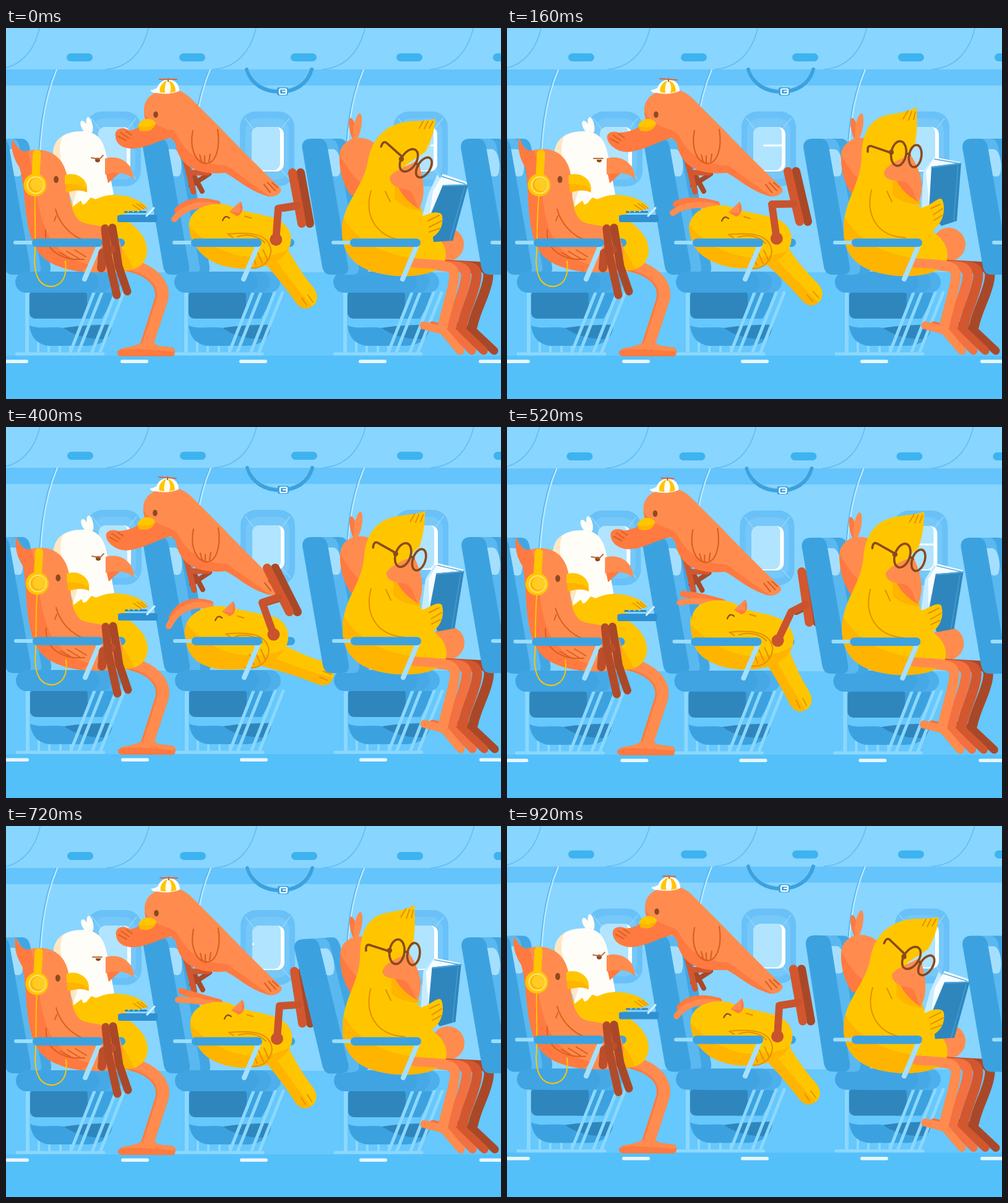
Write an HTML page with a canvas that moves like this. It is 800x600 px and loops after 0.96 s.

```html
<!DOCTYPE html>
<html lang="en">
<head>
<meta charset="utf-8">
<title>Bird flight</title>
<style>
html, body { margin: 0; width: 100%; height: 100%; overflow: hidden; background: #86d4ff; }
canvas { display: block; width: 800px; height: 600px; }
</style>
</head>
<body>
<canvas id="stage" width="800" height="600"></canvas>
<script>
const ctx = document.getElementById('stage').getContext('2d');
const LOOP = 960, STEP = 40, ROW = 257;
const BLUE = '#3ca2df', NAVY = '#2f86bd', PALE = '#9addff';
const YELLOW = '#ffc600', GOLD = '#ffb400', ORANGE = '#ff8c4e', CORAL = '#ff7a40';
const RED = '#d2572f', RUST = '#a94828', BROWN = '#8f4a20', GROOVE = '#d9601f', AMBER = '#e58f00';

// Tracks: [time, ...values], cyclic over the loop.
const tracks = {
  shake: [[0, 0, 0], [160, 1, 0], [240, -.6, -1.2], [400, 1, -1], [520, -1.6, 0], [720, 1, 1], [920, 1, -1.6]],
  curl: [[0, .12], [160, .37], [240, 1], [400, .92], [520, -.35], [720, 0], [920, .16]],
  tail: [[0, 55], [160, 49], [240, 29], [400, 22], [520, 63], [720, 57], [920, 53]],
  foot: [[0, 440, 292, 463, 234, 478, 316], [160, 427, 285, 453, 232, 472, 313], [240, 405, 286, 417, 225, 445, 300],
    [400, 413, 285, 421, 229, 457, 300], [520, 461, 299, 478, 234, 490, 316], [720, 441, 290, 465, 234, 478, 318], [920, 439, 292, 462, 233, 477, 317]],
  crest: [[0, 272, 309], [160, 267, 299], [240, 258, 323], [400, 262, 323], [520, 281, 284], [720, 277, 280], [920, 273, 309]],
  nod: [[0, 1], [160, 0], [240, .08], [400, .46], [520, .45], [720, -.06], [920, 1.08]],
  book: [[0, 1], [160, 0], [240, .06], [400, .45], [520, .45], [720, .12], [920, 1]],
  beat: [[0, 0], [160, 8], [240, 4.5], [400, 5], [520, 6], [720, 4], [920, 0]],
  recline: [[0, .5], [160, 0], [520, 0], [720, -14], [920, 4]]
};

// Monotone cubic through the keys: speed carries on, turning points stay put.
function at(name, t) {
  const keys = tracks[name], n = keys.length;
  const key = i => {
    const turn = Math.floor(i / n), [time, ...values] = keys[i - turn * n];
    return [time + turn * LOOP, ...values];
  };
  let i = n - 1;
  while (keys[i][0] > t) i--;
  const [k0, k1, k2, k3] = [key(i - 1), key(i), key(i + 1), key(i + 2)];
  const span = k2[0] - k1[0], u = (t - k1[0]) / span;
  const slope = (a, b, c) => (b[c] - a[c]) / (b[0] - a[0]);
  const join = (p, q) => p * q > 0 ? 2 * p * q / (p + q) : 0;
  return k1.slice(1).map((v, c) => {
    const s = slope(k1, k2, c + 1);
    const m1 = join(slope(k0, k1, c + 1), s) * span, m2 = join(s, slope(k2, k3, c + 1)) * span;
    return v + u * m1 + u * u * (3 * s * span - 2 * m1 - m2) + u ** 3 * (m1 + m2 - 2 * s * span);
  });
}

function morph(a, b, k) {
  const to = b.match(/-?[\d.]+/g);
  let i = 0;
  return a.replace(/-?[\d.]+/g, n => +n + (to[i++] - n) * k);
}

function fill(color, path) {
  ctx.fillStyle = color;
  ctx.fill(new Path2D(path));
}
function line(color, width, path) {
  ctx.strokeStyle = color;
  ctx.lineWidth = width;
  ctx.stroke(new Path2D(path));
}
function oval(color, x, y, rx, ry = rx, turn = 0) {
  ctx.fillStyle = color;
  ctx.beginPath();
  ctx.ellipse(x, y, rx, ry, turn, 0, 7);
  ctx.fill();
}
function box(color, x, y, w, h, r = 0) {
  ctx.fillStyle = color;
  ctx.beginPath();
  ctx.roundRect(x, y, w, h, r);
  ctx.fill();
}
function shifted(x, y, draw, turn = 0) {
  ctx.save();
  ctx.translate(x, y);
  ctx.rotate(turn);
  draw();
  ctx.restore();
}
function shaded(path, base, shade, shadow) {
  fill(base, path);
  ctx.save();
  ctx.clip(new Path2D(path));
  fill(shade, shadow);
  ctx.restore();
}

function cabin(t) {
  box('#88d5ff', -9, -9, 820, 410);
  box('#66c8fc', -9, 395, 820, 140);
  box('#54c0fa', -9, 530, 820, 90);
  box('#64c4fb', -9, 67, 820, 26);
  for (const x of [82, 330, 578]) {
    line('#58b9f2', 2, `M${x - 2} 67C${x - 22} 115 ${x - 31} 165 ${x - 32} 300`);
    line('#c5ebff', 2, `M${x} 67C${x - 20} 115 ${x - 29} 165 ${x - 30} 300`);
  }
  box('#88d5ff', -9, -9, 820, 76);
  for (const x of [55, 231, 405, 581, 756]) line('#62bdf3', 1.6, `M${x} -4C${x - 8} 36 ${x - 31} 64 ${x - 70} 67`);
  for (const x of [98, 280, 460, 631, 787]) box('#3db3f0', x, 41, 42, 13, 6.5);
  for (const x of [-9, 185, 377, 570, 764]) box('#e9f7ff', x, 536.5, 45, 5.5, 3);
  line(BLUE, 6, 'M389 67C397 92 418 103 442 103S487 92 494 67');
  line('#78c8f7', 1, 'M392 67C400 89 420 99 442 99S482 89 490 67');
  box(BLUE, 438, 96, 18, 13, 3);
  line('#fff', 2.2, 'M444 98.5H451Q453 98.5 453 100V105Q453 107 451 107H444Q442 107 442 105V100Q442 98.5 444 98.5M453 102.5H447');
  for (const x of [130, 378, 626]) porthole(x, t);
}

function porthole(x, t) {
  box('#69c1f7', x, 135, 88, 121, 25);
  box('#76c8f9', x + 9, 146, 70, 99, 20);
  for (const [a, b, c, d] of [[8, 146, 22, 164], [80, 146, 66, 164], [8, 244, 22, 228], [80, 244, 66, 228]])
    line('#8fd6ff', 1.5, `M${x + a} ${b}L${x + c} ${d}`);
  ctx.save();
  ctx.beginPath();
  ctx.roundRect(x + 19, 160, 52, 72, 12);
  ctx.clip();
  box('#fff', x, 150, 90, 90);
  box('#b0e4ff', x + 12, 158, 53, 72, 11);
  // A pale streak outside passes twice per loop.
  const head = 686 - (t % 480) * 1.706;
  for (const left of [head, head - 819]) box('#fff', left, 188.5, 124, 3, 1.5);
  ctx.restore();
}

const BACK = 'M221 193C221 183 227 179 236 179H249C256 179 260 184 262 192L296 386C297 396 292 399 284 399H269C260 399 256 395 254 386Z';
// Leans around the foot of the backrest; lean is the travel of its top edge.
function seatBack(x, lean = 0) {
  shifted(x + 276, 395, () => shifted(-276, -395, () => {
    shifted(33, 0, () => fill('#42a6e3', BACK));
    shifted(17, 0, () => fill('#5ab8f0', BACK));
    fill('#a5dfff', 'M259 196H272C282 198 287 224 281 238Q275 243 266 237Z');
    fill(BLUE, BACK);
  }), lean / 215);
}
function seatBase(x) {
  shifted(x, 0, () => {
    fill(BLUE, 'M380 428H436L412 470H370Z');
    box(NAVY, 295, 424, 93, 46, 9);
    for (const a of [309, 326, 344, 361]) line('#8bd8ff', 4, `M${a} 490V524`);
    fill(BLUE, 'M295 481C310 488 330 482 350 485S400 478 428 480C426 505 410 514 385 514H325Q298 510 295 481Z');
    fill(NAVY, 'M350 485C375 481 400 480 428 480C427 490 424 497 419 503Q375 504 350 485Z');
    line('#8bd8ff', 6, 'M291 430V524');
    for (const a of [399, 412, 434, 447]) line('#8bd8ff', 5, `M${a} 428L${a - 38} 524`);
    line('#8bd8ff', 5, 'M274 527H414');
    box('#4db0ec', 310, 394, 133, 34, 17);
    box('#46a9e6', 290, 394, 137, 34, 17);
    box('#40a4e2', 272, 394, 135, 34, 17);
    farArmrest();
  });
}
function farArmrest() {
  box(BLUE, 420, 340.5, 46, 13.5, 6.7);
}
function armrest(x) {
  shifted(x, 0, () => {
    line('#a4e0ff', 8, 'M407 352L384 406');
    line(PALE, 6, 'M272 347H304');
    box(BLUE, 299, 340.5, 114, 13.5, 6.7);
  });
}

function eagle(t) {
  const busy = Math.floor(t / STEP) % 2;
  const sleepy = (t >= 120 && t < 320) || (t >= 640 && t < 800);
  line(ORANGE, 21, 'M190 382C234 389 256 413 252 437L228 510');
  line(CORAL, 3, 'M190 391C226 397 246 414 242 437L219 510');
  fill(CORAL, 'M180 523C190 515 207 517 216 510H240C247 517 260 514 270 517Q276 524 270 531H188Q179 531 180 523Z');
  fill(ORANGE, 'M183 520C193 515 207 517 216 510H240C247 517 260 514 270 517Q274 521 270 524Q228 518 183 520Z');
  shaded('M105 282C130 270 165 270 180 300C211 322 227 335 228 360C227 390 196 400 165 386L110 340Z', YELLOW, GOLD,
    'M100 325C160 320 180 335 207 391L120 400Z');
  box('#2f91d1', 180, 302, 64, 12, 3);
  shaded('M76 204C76 179 96 167 122 167C149 166 159 184 163 210L174 269L150 279L137 274L125 288L121 279L108 289C108 264 76 239 76 204Z', '#fffdf7', '#ffe7c4',
    'M70 160H103C75 184 87 230 116 258L106 292L70 240Z');
  oval('#fffdf7', 127, 160, 5, 11, -.5);
  oval('#fffdf7', 135, 157, 5, 13, -.2);
  fill(CORAL, 'M160 228L187 231L165 251Z');
  fill(ORANGE, 'M160 211C180 205 205 215 206 244C196 235 181 232 160 237Z');
  oval(BROWN, 148, 213.5, 4, 3.8);
  if (sleepy) box('#fffdf7', 142, 208, 12, 5);
  line('#bd6a39', 2, sleepy ? 'M139 211H154' : 'M138 210L151 212L157 206');
  fill(YELLOW, 'M104 293C134 284 151 270 174 270C200 270 219 279 228 290C219 297 204 295 194 301C165 303 152 322 107 318Z');
  shifted(0, -busy, () => line(AMBER, 1.6, 'M205 286L218 295M211 284L223 293M217 284L227 292'));
  line('#d8f2ff', 3, 'M227 304L239 291');
  box('#2f86bd', 191, 296, 36, 3, 1);
  for (const x of [196, 204, 212]) box('#74c9f6', x + busy * 2, 296, 3, 2);
  shifted(-ROW - 17, 0, farArmrest);
}

function listener(t) {
  const [b] = at('beat', t);
  const body = morph(
    'M10 181C16 187 18 196 29 200C66 190 92 206 98 237C104 267 101 294 119 312C136 322 164 316 174 332C191 347 190 374 180 392C145 399 84 396 57 368C26 335 34 264 22 226C14 213 8 200 10 181Z',
    'M18 177C24 187 24 195 36 199C73 188 97 205 102 237C106 267 101 294 119 312C136 322 164 316 174 332C191 347 190 374 180 392C145 399 84 396 57 368C28 335 36 264 29 226C21 213 16 200 18 177Z', b / 8);
  shaded(body, ORANGE, CORAL, `M0 170L${36 + b} 200C${57 + b} 280 45 360 135 383L110 405H20Z`);
  line(GROOVE, 2, 'M64 326C61 358 88 377 126 374M80 293C85 312 101 337 132 345M81 304L78 312M87 363L106 374M98 361L118 373M111 359L129 370');
  shifted(b * .45, 0, () => {
    fill(GOLD, 'M95 239C116 232 133 247 131 266C119 260 107 264 97 266Z');
    fill(YELLOW, 'M95 238C116 231 133 247 131 261C119 252 107 252 95 252Z');
    oval(BROWN, 81, 245, 4, 5.8);
  });
  line(YELLOW, 2, `M${47 + b * .5} 269C46 310 49 350 46 376C47 405 56 418 74 418C92 416 99 400 96 377`);
  shifted(b * .5, 0, () => {
    line(YELLOW, 13, 'M50 203L48 237');
    oval(YELLOW, 47, 254, 18.5);
    oval('#ffe16b', 48, 254, 14.5);
    oval(GOLD, 48, 254, 12);
    oval('#ffcc24', 50, 253, 10.5);
  });
}
function listenerFeet() {
  line(RUST, 13, 'M172 323L182 385L196 426');
  line('#bd4e2b', 14, 'M154 388L156 364L170 358');
  line('#b34b29', 13, 'M160 324L164 365L179 432');
}

function kid(t) {
  const phase = (t % 240) / STEP, reach = [0, .5, 1, 1.15, 1.05, .45][phase];
  line(RUST, 8, 'M328 236L299 255M302 236L317 264');
  line(RED, 9, 'M290 214L303 265M301 234H326');
  const lean = -2 * reach;
  const arm = morph(
    'M265 178C243 183 229 193 207 195C191 196 178 189 177 176C174 164 187 158 200 166C211 164 218 158 229 155L263 158Z',
    'M265 178C243 183 225 196 199 200C179 202 165 190 162 180C159 170 169 165 181 169C199 169 209 161 224 156L263 158Z', reach);
  fill(CORAL, arm);
  shifted(-14 * reach, 4 * reach, () => line(GROOVE, 2, 'M181 175L194 182M185 169L198 178M194 167L203 173'));
  const body = `M${223 + lean} 133C${223 + lean} 112 ${240 + lean} 101 264 99C281 98 294 108 304 119L346 161C370 186 405 222 443 258Q448 265 436 271Q428 275 417 270C392 262 372 243 354 234C319 237 287 230 276 197C274 184 272 177 250 173C233 169 ${223 + lean} 152 ${223 + lean} 133Z`;
  shaded(body, ORANGE, CORAL, 'M215 120C228 163 260 158 275 171C295 212 326 222 356 222L430 275H260L215 180Z');
  line(GROOVE, 2.2, 'M302 166C296 194 306 216 321 219C339 221 347 194 342 164M313 205L316 216M321 207V219M330 204L328 216M417 253L427 266M423 250L435 263M430 250L439 258');
  shifted(lean, 0, () => {
    oval(BROWN, 242, 140, 3.8, 5.2);
    fill(GOLD, 'M213 158C219 144 238 144 242 155C238 166 227 169 216 166Z');
    fill(YELLOW, 'M213 158C219 144 238 144 242 155C235 161 224 162 213 158Z');
    const hat = 'M243 105C243 77 281 77 280 102Q263 109 243 105Z';
    fill('#fffdf4', hat);
    fill(YELLOW, 'M249 104C247 96 252 88 260 85C257 91 256 98 257 105ZM265 105C268 97 266 90 262 85C271 87 274 95 274 103Z');
    fill('#fffdf4', 'M248 104C239 107 233 103 234 100C238 101 242 97 247 96Z');
    line(RUST, 1.8, 'M262 86V82');
    const w = 14 - 4 * (phase % 2);
    line('#e85f38', 2, `M${262 - w} ${83 - reach}L${262 + w} ${83 + reach}`);
  });
}

function sleeper(t) {
  const [k] = at('curl', t), [tail] = at('tail', t), [cx, cy] = at('crest', t);
  const [kx, ky, tx, ty, bx, by] = at('foot', t);
  const dx = -16 * k, dy = 3 * k;
  shifted(442, 375 - 2 * k, () => {
    fill(GOLD, 'M-35 -25C10 -17 40 -17 66 -19C84 -20 92 -11 92 0C92 14 82 19 66 18C42 18 10 20 -35 26Z');
    fill(YELLOW, 'M-35 -25C10 -17 40 -17 66 -19C84 -20 92 -11 92 0C58 2 20 7 -35 4Z');
    line(AMBER, 1.8, 'M73 -5H87M71 6H85');
  }, tail * Math.PI / 180);
  line(CORAL, 10, `M${344 + dx} ${284 + dy}Q${300 + dx} ${272 + dy} ${cx + 5} ${cy - 14}`);
  line(ORANGE, 10, `M${344 + dx} ${288 + dy}Q${298 + dx} ${279 + dy} ${cx} ${cy}`);
  const body = morph(
    'M297 319C296 290 330 278 362 286C385 300 415 299 440 310C468 325 470 356 440 377C402 398 343 392 318 367C304 351 297 336 297 319Z',
    'M287 338C285 308 314 290 346 291C375 296 401 302 426 306C456 313 460 341 450 360C431 386 400 396 352 395C316 393 300 381 292 361C289 351 287 346 287 338Z', k);
  shaded(body, YELLOW, GOLD, `M280 ${300 + dy}C${330 + dx} 365 395 390 465 354V410H280Z`);
  shifted(dx, dy, () => {
    fill(CORAL, 'M363 297L381 280C387 290 384 302 375 304Z');
    fill(ORANGE, 'M363 297L381 280L380 298Z');
    line(BROWN, 2.3, 'M352 311Q356 301 363 307');
    line(AMBER, 2.3, 'M388 304L398 307');
  });
  shifted(dx * .35, dy, () => line(AMBER, 2, 'M359 333C388 330 426 329 429 360C427 381 410 391 390 387M398 366L405 383M407 362L415 380M416 358L423 374M359 333L367 338M375 337C394 331 411 338 419 347'));
  const mx = (tx + bx) / 2, my = (ty + by) / 2 + 12, hx = 437 - 6 * k, hy = 343 - 7 * k;
  line(RUST, 14, `M${tx + 13} ${ty}L${bx + 13} ${by}`);
  line(RUST, 10, `M${kx + 8} ${ky}L${mx + 10} ${my}`);
  line(RED, 14, `M${tx} ${ty}L${bx} ${by}`);
  line('#c9532d', 12, `M${hx} ${hy}L${kx} ${ky}L${mx} ${my}`);
  oval('#c9532d', hx, hy, 10);
}

function neighbour() {
  oval(CORAL, 561, 165, 5.5, 20, -.22);
  oval(ORANGE, 568, 160, 6, 22, .18);
  shaded('M539 205C541 173 592 166 607 202L615 265L557 270C544 253 538 227 539 205Z', ORANGE, CORAL, 'M530 190C551 224 562 250 598 264V290H530Z');
  oval(ORANGE, 713, 350, 27, 27);
}

function readerLegs() {
  const leg = (color, knee, ankle, toe) => {
    line(color, 16, `M675 381L${knee - 12} 386Q${knee + 3} 389 ${knee} 405C${knee - 3} 430 ${ankle + 5} 455 ${ankle} 482`);
    line(color, 13, `M${ankle - 31} 481L${ankle} 489L${toe} 522`);
  };
  leg(RUST, 779, 754, 789);
  leg(RED, 760, 737, 772);
  leg('#f37140', 743, 720, 753);
  leg(ORANGE, 724, 706, 734);
}

function glasses(n) {
  const x = 632 + 19 * n, y = 203 + 11 * n;
  oval(BROWN, x - 12, y - 2, 4.2);
  shifted(x, y, () => {
    ctx.strokeStyle = '#8b491c';
    ctx.lineWidth = 3.6;
    for (const [px, py, rx, ry] of [[0, 0, 12, 20], [27, 2 - 3 * n, 10, 18]]) {
      ctx.beginPath();
      ctx.ellipse(px, py, rx, ry, .08, 0, 7);
      ctx.stroke();
    }
    line('#8b491c', 3.6, 'M12 1Q16 -3 18 1M-12 0L-43 -8Q-52 -11 -50 1');
  }, .08 + .4 * n);
}

function reader(t) {
  const [n] = at('nod', t), [b] = at('book', t);
  neighbour();
  readerLegs();
  const body = morph(
    'M661 128C647 136 632 137 617 140C583 146 573 173 572 207C572 250 545 276 543 321C541 361 560 386 600 396C640 406 690 402 707 382C716 365 709 345 690 332L668 290C652 280 638 276 628 258L640 215L658 190C662 170 662 149 661 128Z',
    'M694 147C678 152 656 148 636 154C599 165 588 194 584 220C577 256 546 283 543 322C541 361 560 386 600 396C640 406 690 402 707 382C716 365 709 345 690 332L672 296C656 286 640 281 630 264L646 222L678 200C687 183 693 165 694 147Z', n);
  shaded(body, YELLOW, GOLD, 'M535 285C559 347 613 376 715 376V415H535Z');
  line(AMBER, 2, morph('M647 134L639 147M653 135L648 149M659 136L656 148', 'M674 151L668 162M682 151L676 163M690 151L684 162', n));
  fill(GOLD, morph('M622 248L655 244L668 286C648 286 631 278 622 270Z', 'M628 254L660 255L672 296C650 294 635 286 628 275Z', n));
  fill(CORAL, morph('M628 246L648 245L663 281C648 272 636 262 628 246Z', 'M633 255L653 255L667 293C652 283 640 272 633 255Z', n));
  fill(ORANGE, morph('M608 234C613 220 633 213 651 205C663 222 672 247 669 264Q668 276 663 282C657 268 653 251 638 248C624 247 609 246 608 234Z',
    'M620 242C623 232 648 224 665 214C674 237 678 265 672 281Q670 288 667 293C662 279 661 265 647 261C633 259 621 255 620 242Z', n));
  glasses(n);
  // Book: inner cover, pages, outer cover.
  fill('#c8ecff', morph('M672 230L688 211L697 219L684 294L669 291Z', 'M683 268L697 237L708 251L692 302L673 304Z', b));
  fill('#f7fcff', morph('M676 231L690 209L732 217L728 223L686 230L681 284Z', 'M690 264L706 236L747 250L741 257L704 260L685 300Z', b));
  line('#43a3d9', 1.4, morph('M690 212L730 219', 'M704 240L742 252', b));
  fill(NAVY, morph('M685 224L733 218L726 312L701 320L681 296Z', 'M706 254L747 253L722 344L691 346L685 305Z', b));
  line('#4ba9df', 2, morph('M687 225L732 219', 'M707 255L746 254', b));
  line('#43a3d9', 1.2, morph('M728 223L721 313', 'M741 258L717 344', b));
  fill(YELLOW, morph('M598 278C628 300 658 297 679 287C691 281 700 271 703 279C708 294 704 312 692 323C676 337 650 349 614 340Z',
    'M598 278C628 310 653 311 677 303C690 296 704 297 705 304C707 318 702 330 690 338C673 347 647 352 614 343Z', b));
  line(AMBER, 2, morph('M588 262C579 300 594 337 643 339M613 264L621 281M684 292L699 285M688 302L703 292M689 311L702 303',
    'M590 263C579 300 594 337 643 344M613 264L621 281M682 312L700 303M684 322L704 312M684 330L701 324', b));
  line(ORANGE, 15, 'M659 380L704 383');
}

function scene(t) {
  const [sx, sy] = at('shake', t), [recline] = at('recline', t);
  ctx.lineCap = ctx.lineJoin = 'round';
  shifted(sx, sy, () => {
    cabin(t);
    seatBack(-ROW);
    seatBack(0);
    for (const x of [-ROW, 0, ROW]) seatBase(x);
    eagle(t);
    listener(t);
    armrest(-ROW);
    listenerFeet();
    kid(t);
    sleeper(t);
    armrest(0);
    seatBack(ROW, recline);
    reader(t);
    armrest(ROW);
    seatBack(2 * ROW);
    armrest(2 * ROW);
  });
}

const start = performance.now();
function play() {
  const t = (performance.now() - start) % LOOP;
  scene(Math.floor(t / STEP) * STEP);
  requestAnimationFrame(play);
}
play();
</script>
</body>
</html>
```
